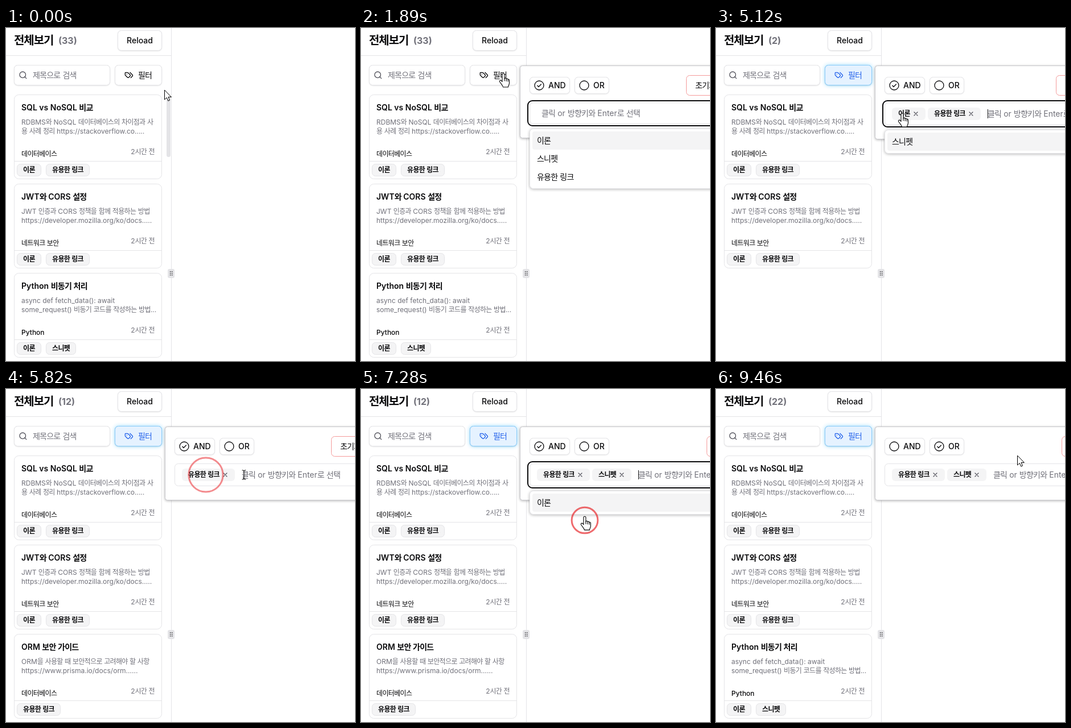
An HTML page with a canvas that plays this animation: 613 px wide and 586 px high, repeating every 9.79 s.

```html
<!DOCTYPE html>
<html lang="ko">
<head>
<meta charset="utf-8">
<style>
  html, body { margin: 0; width: 100%; height: 100%; overflow: hidden; background: #fff; }
  canvas { display: block; }
</style>
</head>
<body>
<canvas id="stage" width="613" height="586"></canvas>
<script>
const ctx = document.getElementById('stage').getContext('2d');
const LOOP = 9790;
const INK = '#09090b', GRAY = '#71717a', LINE = '#e4e4e7', SOFT = '#f4f4f5';
const FONT = 'Inter, "Noto Sans CJK KR", "Noto Sans CJK JP", sans-serif';
const THEORY = '이론', SNIPPET = '스니펫', LINK = '유용한 링크';
const TAGS = [THEORY, SNIPPET, LINK];

const SQL = { title: 'SQL vs NoSQL 비교', category: '데이터베이스', tags: [THEORY, LINK],
  lines: ['RDBMS와 NoSQL 데이터베이스의 차이점과 사', '용 사례 정리 https://stackoverflow.co.....'] };
const JWT = { title: 'JWT와 CORS 설정', category: '네트워크 보안', tags: [THEORY, LINK],
  lines: ['JWT 인증과 CORS 정책을 함께 적용하는 방법', 'https://developer.mozilla.org/ko/docs.....'] };
const PYTHON = { title: 'Python 비동기 처리', category: 'Python', tags: [THEORY, SNIPPET],
  lines: ['async def fetch_data(): await', 'some_request() 비동기 코드를 작성하는 방법...'] };
const ORM = { title: 'ORM 보안 가이드', category: '데이터베이스', tags: [LINK],
  lines: ['ORM을 사용할 때 보안적으로 고려해야 할 사항', 'https://www.prisma.io/docs/orm......'] };

// Timelines: [start, value]
const CHIPS = [[0, []], [2210, [THEORY]], [3880, [THEORY, LINK]], [5230, [LINK]], [6850, [LINK, SNIPPET]]];
const RESULTS = [
  [0, { count: 33, cards: [SQL, JWT, PYTHON] }],
  [2760, { count: 13, cards: [SQL, JWT, PYTHON] }],
  [3880, { count: 2, cards: [SQL, JWT] }],
  [5750, { count: 12, cards: [SQL, JWT, ORM] }],
  [7380, { count: 0, cards: [] }],
  [8550, { count: 22, cards: [SQL, JWT, PYTHON] }]
];
const FOCUS = [[0, false], [1360, true], [5230, false], [5845, true], [8050, false]];
const ACTIVE = [[0, 0], [3320, 1], [3880, 0], [6560, 1], [6850, 0]];
const CARET = [[0, true], [1890, false], [2210, true], [3290, false], [3820, true], [4360, false],
  [4860, true], [6375, false], [6850, true], [7380, false], [7910, true]];
const CLICKS = [[610, 250, 82], [5230, 351, 151], [5845, 418, 151], [6850, 393, 231], [8050, 391, 100.5]];
// Pointer moves: [start, end, x, y]
const MOVES = [[310, 600, 250, 82], [4860, 5120, 327, 152], [5120, 5220, 351, 151], [5400, 5800, 418, 151],
  [6150, 6520, 398, 217], [6520, 6720, 393, 231], [7200, 7900, 391, 100.5], [9220, 9460, 529, 117]];

const at = (timeline, t) => timeline.filter(([start]) => t >= start).pop()[1];
const progress = (t, start, end) => Math.min(1, Math.max(0, (t - start) / (end - start)));
const inside = (p, x, y, right, bottom) => p.x >= x && p.x <= right && p.y >= y && p.y <= bottom;

// Hangul is set a little tighter than Latin.
function text(s, x, y, size = 14, weight = 400, color = INK, align = 0) {
  ctx.font = `${weight} ${size}px ${FONT}`;
  const runs = s.match(/[가-힣]+|[^가-힣]+/g).map(run => {
    const spacing = /[가-힣]/.test(run) ? `${-0.054 * size}px` : '0px';
    ctx.letterSpacing = spacing;
    return { run, spacing, width: ctx.measureText(run).width };
  });
  const total = runs.reduce((sum, r) => sum + r.width, 0);
  x -= total * align;
  ctx.fillStyle = color;
  for (const r of runs) {
    ctx.letterSpacing = r.spacing;
    ctx.fillText(r.run, x, Math.round(y + size * 0.36));
    x += r.width;
  }
  return total;
}

function measure(s, size, weight) {
  return text(s, -999, -999, size, weight);
}

function box(x, y, w, h, radius, fill, stroke, lineWidth = 1) {
  ctx.beginPath();
  ctx.roundRect(x, y, w, h, radius);
  if (fill) { ctx.fillStyle = fill; ctx.fill(); }
  if (stroke) { ctx.strokeStyle = stroke; ctx.lineWidth = lineWidth; ctx.stroke(); }
}

const frame = (x, y, w, h, radius, fill = '#fff', stroke = LINE) =>
  box(x + 0.5, y + 0.5, w - 1, h - 1, radius, fill, stroke);

// The second pass covers the part of the shadow that falls inside the shape.
function shadowed(color, blur, dy, draw) {
  ctx.save();
  ctx.shadowColor = color;
  ctx.shadowBlur = blur;
  ctx.shadowOffsetY = dy;
  draw();
  ctx.restore();
  draw();
}

function icon(x, y, scale, paths, color, width = 2, fill) {
  ctx.save();
  ctx.translate(x, y);
  ctx.scale(scale, scale);
  ctx.lineWidth = width;
  ctx.lineCap = ctx.lineJoin = 'round';
  ctx.strokeStyle = color;
  for (const d of paths) {
    const path = new Path2D(d);
    if (fill) { ctx.fillStyle = fill; ctx.fill(path); }
    ctx.stroke(path);
  }
  ctx.restore();
}

const cross = (x, y) => icon(x, y, 1, ['M-3-3 3 3M3-3-3 3'], '#52525b', 1.2);

function drawCard(card, y) {
  frame(14, y, 260, 149, 8);
  text(card.title, 27, y + 23, 14, 600);
  card.lines.forEach((line, i) => text(line, 27, y + 49 + 16 * i, 12, 400, GRAY));
  text(card.category, 27, y + 104.5, 12, 500);
  text('2시간 전', 261, y + 101, 12, 400, GRAY, 1);
  ctx.fillStyle = LINE;
  ctx.fillRect(14, y + 117, 260, 1);
  let x = 19;
  for (const tag of card.tags) {
    const w = Math.round(measure(tag, 12, 600)) + 22;
    frame(x, y + 122, w, 22, 6, SOFT);
    text(tag, x + 11, y + 133, 12, 600);
    x += w + 8;
  }
}

function drawSidebar(t) {
  const { count, cards } = at(RESULTS, t);
  text('전체보기', 14, 22, 20, 700);
  text(`(${count})`, 92, 22, 16, 700, GRAY);
  shadowed('rgba(0,0,0,.08)', 2, 1, () => frame(196, 4, 78, 36, 6));
  text('Reload', 235, 22, 14, 500, INK, 0.5);
  ctx.fillStyle = LINE;
  ctx.fillRect(0, 48, 290, 1);
  ctx.fillRect(290, 0, 1, 586);

  shadowed('rgba(0,0,0,.08)', 2, 1, () => frame(14, 65, 169, 36, 6));
  icon(22, 75, 0.66, ['M3 11a8 8 0 1 0 16 0a8 8 0 1 0-16 0', 'm21 21-4.3-4.3'], '#52525b');
  text('제목으로 검색', 47, 83, 14, 400, GRAY);

  const blue = progress(t, 2760, 2890);
  shadowed('rgba(0,0,0,.08)', 2, 1, () => frame(191, 65, 83, 36, 6));
  ctx.globalAlpha = blue;
  shadowed('rgba(56,189,248,.45)', 6, 0, () => frame(191, 65, 83, 36, 6, '#e5f2ff', '#8accfa'));
  ctx.globalAlpha = 1;
  const color = blue > 0.5 ? '#2563eb' : INK;
  icon(208, 75, 0.66, [
    'm15 5 6.3 6.3a2.4 2.4 0 0 1 0 3.4L17 19',
    'M9.6 5.6A2 2 0 0 0 8.2 5H3a1 1 0 0 0-1 1v5.2a2 2 0 0 0 .6 1.4l5.5 5.5a2.4 2.4 0 0 0 3.4 0l3.6-3.6a2.4 2.4 0 0 0 0-3.4z',
    'M6.5 9.5h.01'], color);
  text('필터', 232, 83, 14, 500, color);

  cards.forEach((card, i) => drawCard(card, 117 + 157 * i));
  if (t < 70) box(282, 122, 7, 105, 3.5, LINE);
  box(284, 424, 12, 16, 3, LINE);
  ctx.fillStyle = INK;
  for (let i = 0; i < 6; i++) ctx.fillRect(288 + (i % 2) * 3, 428 + (i >> 1) * 3, 1.3, 1.3);
}

function drawMode(label, x, w, checked, hovered) {
  shadowed('rgba(0,0,0,.06)', 2, 1, () => frame(x, 86, w, 30, 6, hovered ? '#f1f1f2' : '#fff'));
  const paths = ['M-8 0a8 8 0 1 0 16 0a8 8 0 1 0-16 0'];
  if (checked) paths.push('M-3.2.3-1 2.5 3.4-2');
  icon(x + 17, 101, 1, paths, INK, 1.3);
  text(label, x + 33, 101, 14, 500);
}

function drawPopover(t, pointer) {
  const chips = at(CHIPS, t), focus = at(FOCUS, t);
  const bottom = chips.length ? 171 : 169, middle = (131 + bottom) / 2;
  ctx.globalAlpha = progress(t, 700, 850);
  shadowed('rgba(0,0,0,.25)', 4, 1, () => box(279.5, 66.5, 400, bottom - 42, 4, '#fff', '#c8c8cc'));

  const or = t >= 8150;
  drawMode('AND', 296, 71, !or, inside(pointer, 296, 86, 367, 116));
  drawMode('OR', 375, 61, or, inside(pointer, 375, 86, 436, 116));

  if (focus) box(293, 128, 400, bottom - 125, 8, '#fff', INK, 2);
  frame(296, 131, 400, bottom - 131, 6);
  let x = 309;
  for (const chip of chips) {
    const w = Math.round(measure(chip, 12, 600)) + 38;
    box(x, 140, w, 22, 6, SOFT);
    text(chip, x + 11, 151, 12, 600);
    cross(x + w - 17, 151);
    x += w + 4;
  }
  x += 8;
  text('클릭 or 방향키와 Enter로 선택', x, middle, 14, 400, GRAY);
  if (focus && at(CARET, t)) {
    ctx.fillStyle = INK;
    ctx.fillRect(x, middle - 8, 1, 16);
  }
  const resetX = Math.max(571, x + 120);
  frame(resetX, 83, 100, 36, 6, '#fff', '#f59a9a');
  text('초기화', resetX + 16, 101, 14, 500);

  if (focus) drawOptions(TAGS.filter(tag => !chips.includes(tag)), bottom + 8, at(ACTIVE, t));
  ctx.globalAlpha = 1;
}

function drawOptions(options, y, active) {
  shadowed('rgba(0,0,0,.25)', 5, 1, () => frame(296, y, 400, options.length * 32 + 10, 6));
  options.forEach((option, i) => {
    const top = y + 5 + 32 * i;
    if (i === active) box(301, top, 390, 32, 4, SOFT);
    text(option, 309, top + 16);
  });
}

function pointerAt(t) {
  let x = 278, y = 109;
  for (const [start, end, toX, toY] of MOVES) {
    const p = progress(t, start, end), e = p * p * (3 - 2 * p);
    x += (toX - x) * e;
    y += (toY - y) * e;
  }
  return { x, y };
}

function drawPointer(t, p) {
  const onInput = inside(p, 296, 131, 613, 171);
  const hand = inside(p, 191, 65, 274, 101) || inside(p, 296, 86, 367, 116) || inside(p, 375, 86, 436, 116) ||
    onInput && p.x < 402 || at(FOCUS, t) && inside(p, 296, 180, 613, 285);
  if (hand) {
    icon(p.x, p.y, 1, [
      'M-2 11V0C-2-2.6 2-2.6 2 0V7C2.4 5.6 5 5.8 5.2 7.6C6 6.4 8 7 8.2 8.6C9.2 7.8 10.5 8.6 10.5 10V15C10.5 18 8.5 19 8.5 22H-.5C-.8 19-4 16.5-6.3 12.8C-7.4 10.8-5.2 9-3.6 10.6L-2 12.5Z',
      'M2 7V11M5.2 8V11.5M8.2 9V12'], '#000', 1.1, '#fff');
  } else if (onInput) {
    icon(p.x, p.y, 1, ['M-3-8H-1L0-7 1-8H3M0-7V7M-3 8H-1L0 7 1 8H3'], '#000', 1);
  } else {
    icon(p.x + 0.5, p.y + 0.5, 1, ['M0 0V16.5L3.8 13 6.3 18.8 9 17.6 6.5 12H11.5Z'], '#000', 1, '#fff');
  }
}

function drawClick(t, [start, x, y]) {
  const p = (t - start) / 870;
  if (p < 0 || p >= 1) return;
  ctx.beginPath();
  ctx.arc(x, y, 41 * p * (1.25 - 0.25 * p), 0, Math.PI * 2);
  ctx.strokeStyle = `rgba(230,20,25,${1 - 0.75 * p})`;
  ctx.lineWidth = 3;
  ctx.stroke();
}

function draw(now) {
  const t = now % LOOP, pointer = pointerAt(t);
  ctx.fillStyle = '#fff';
  ctx.fillRect(0, 0, 613, 586);
  drawSidebar(t);
  if (t >= 700) drawPopover(t, pointer);
  CLICKS.forEach(click => drawClick(t, click));
  drawPointer(t, pointer);
  requestAnimationFrame(draw);
}
requestAnimationFrame(draw);
</script>
</body>
</html>
```
